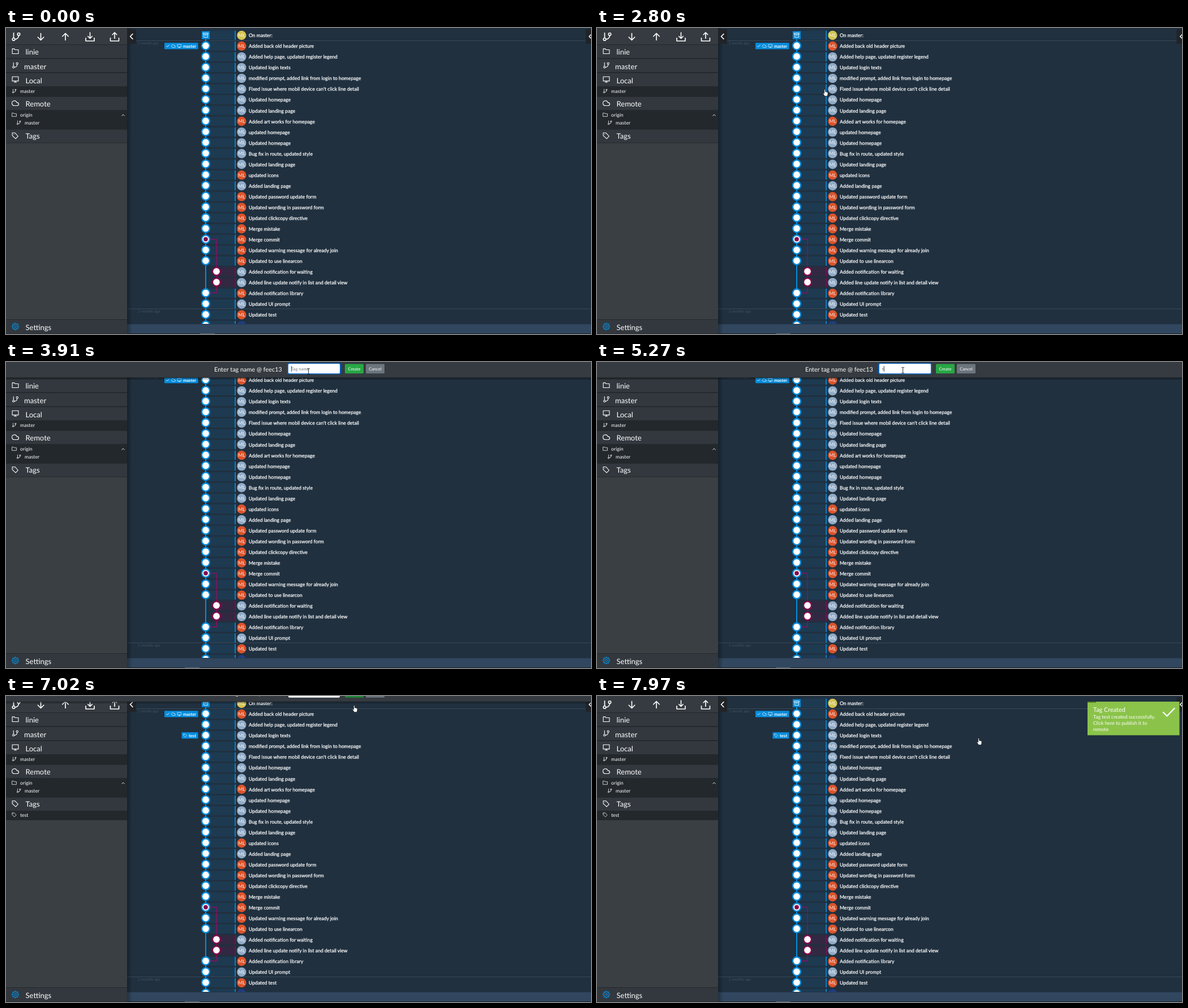
An HTML page for the animation above (8000 ms loop, 1034x542 px).

```html
<!DOCTYPE html>
<html lang="en">
<head>
<meta charset="utf-8">
<title>Commit graph: create a tag</title>
<style>
html, body { margin: 0; width: 100%; height: 100%; overflow: hidden; background: #20303f; }
svg { display: block; }
text {
  font-family: Lato, "Open Sans", sans-serif; fill: #fff; white-space: pre;
  text-rendering: geometricPrecision;
}
.ico { fill: none; stroke-linecap: round; stroke-linejoin: round; }

/* One shared 8 s clock; 1% is 80 ms */
.anim { animation: 8s linear infinite; }
.step { animation: 8s step-end infinite; }

#panel { animation-name: panel; }
@keyframes panel {
  0%, 35.25% { transform: translateY(-31px); animation-timing-function: ease; }
  37.75%, 86.94% { transform: none; animation-timing-function: ease; }
  89.44%, 100% { transform: translateY(-31px); }
}

#cursor { animation-name: move; }
@keyframes move {
  0%, 5.375% { transform: translate(609px, 426px); }
  6.125% { transform: translate(420px, 265px); }
  7%, 9.875% { transform: translate(249px, 117px); }
  11.25% { transform: translate(300px, 84px); }
  12.75% { transform: translate(440px, 30px); }
  13.75% { transform: translate(478px, 12px); }
  15.625%, 24.125% { transform: translate(380px, 71px); }
  26.375%, 28.625% { transform: translate(397px, 92px); }
  30.375%, 38.75% { transform: translate(399px, 108px); }
  44.25%, 44.875% { transform: translate(515px, 17px); }
  50.375%, 77.625% { transform: translate(537px, 9px); }
  82.375%, 94.75% { transform: translate(612px, 16px); }
  99.625%, 100% { transform: translate(671px, 74px); }
}
#arrow { animation-name: arrow; }
@keyframes arrow {
  0% { visibility: hidden; } 5.375% { visibility: visible; }
  11.5% { visibility: hidden; } 40% { visibility: visible; }
  44.875% { visibility: hidden; } 78.625% { visibility: visible; }
  80.375%, 100% { visibility: hidden; }
}
#hand { animation-name: hand; }
@keyframes hand {
  0% { visibility: hidden; } 11.5% { visibility: visible; }
  40% { visibility: hidden; } 80.375%, 100% { visibility: visible; }
}
#ibeam { animation-name: ibeam; }
@keyframes ibeam {
  0% { visibility: hidden; } 44.875% { visibility: visible; }
  78.625%, 100% { visibility: hidden; }
}

#hover3 { animation-name: hover3; }
@keyframes hover3 {
  0% { visibility: hidden; } 15.5% { visibility: visible; }
  24.125%, 100% { visibility: hidden; }
}
#hover5 { animation-name: hover5; }
@keyframes hover5 {
  0% { visibility: hidden; } 35.75% { visibility: visible; }
  39.5%, 100% { visibility: hidden; }
}
#thumb { animation-name: thumb; }
@keyframes thumb {
  0% { transform: none; } 17.5%, 100% { transform: translateX(-27px); }
}

#focus { animation-name: focus; }
@keyframes focus {
  0% { visibility: hidden; } 48% { visibility: visible; }
  84.75%, 100% { visibility: hidden; }
}
#hint { animation-name: hint; }
@keyframes hint {
  0% { visibility: visible; } 65.875%, 100% { visibility: hidden; }
}
#k0 { animation-name: k0; }
#k1 { animation-name: k1; }
#k2 { animation-name: k2; }
#k3 { animation-name: k3; }
@keyframes k0 { 0% { visibility: hidden; } 65.875%, 100% { visibility: visible; } }
@keyframes k1 { 0% { visibility: hidden; } 67.5%, 100% { visibility: visible; } }
@keyframes k2 { 0% { visibility: hidden; } 71.125%, 100% { visibility: visible; } }
@keyframes k3 { 0% { visibility: hidden; } 72.125%, 100% { visibility: visible; } }
#caret { animation-name: blink, caret; }
@keyframes blink {
  0% { visibility: hidden; } 48% { visibility: visible; }
  54.25% { visibility: hidden; } 60.5% { visibility: visible; }
  78.375% { visibility: hidden; } 84.625% { visibility: visible; }
  87%, 100% { visibility: hidden; }
}
@keyframes caret {
  0% { transform: none; } 65.875% { transform: translateX(2.9px); }
  67.5% { transform: translateX(6.9px); } 71.125% { transform: translateX(10.3px); }
  72.125%, 100% { transform: translateX(13.2px); }
}
#create { animation-name: create; }
@keyframes create {
  0% { fill: #28a745; } 80.375%, 100% { fill: #218838; }
}

.made { animation-name: made; }
@keyframes made {
  0% { visibility: hidden; } 87%, 100% { visibility: visible; }
}
#toast { animation-name: toast; }
@keyframes toast {
  0%, 90.5% { opacity: 0; } 93.5%, 100% { opacity: 1; }
}
#bar { animation-name: bar; }
@keyframes bar {
  0%, 93.5% { transform: scaleX(0); } 100% { transform: scaleX(.1); }
}
</style>
</head>
<body>
<script>
const BLUE = '#078ddd', PLUM = '#85094e', DARK = '#23282d';
const AVATAR = { Y: '#d3c452', O: '#dc532a', B: '#91abc6', N: '#1d3c80' };
const COMMITS = `Y On master:
O Added back old header picture
B Added help page, updated register legend
B Updated login texts
B modified prompt, added link from login to homepage
B Fixed issue where mobil device can't click line detail
B Updated homepage
B Updated landing page
O Added art works for homepage
B updated homepage
B Updated homepage
B Bug fix in route, updated style
B Updated landing page
O updated icons
B Added landing page
O Updated password update form
O Updated wording in password form
O Updated clickcopy directive
O Merge mistake
O Merge commit
O Updated warning message for already join
O Updated to use linearcon
B Added notification for waiting
B Added line update notify in list and detail view
O Added notification library
B Updated UI prompt
O Updated test
N `.split('\n');

// Outline icons on a 24 unit grid
const dot = (x, y, r) => `M${x - r} ${y}a${r} ${r} 0 1 0 ${2 * r} 0a${r} ${r} 0 1 0 ${-2 * r} 0`;
const teeth = [...Array(16)].map((_, i) => {
  const point = (r, a) => `${12 + r * Math.cos(a)} ${12 + r * Math.sin(a)}`;
  const a = i * Math.PI / 8, r = i % 2 ? 8 : 11;
  return point(r, a - .15) + 'L' + point(r, a + .15);
}).join('L');
const ICONS = {
  branch: 'M6 3v12M18 9a9 9 0 0 1-9 9' + dot(18, 6, 3) + dot(6, 18, 3),
  down: 'M12 4v16M5 13l7 7 7-7',
  up: 'M12 20V4M5 11l7-7 7 7',
  download: 'M2 15v7h20v-7M12 2v14M7 11l5 5 5-5',
  upload: 'M2 15v7h20v-7M12 16V2M7 7l5-5 5 5',
  folder: 'M2 4h7l2 3h11v13H2z',
  monitor: 'M2 3h20v14H2zM8 21h8M12 17v4',
  cloud: 'M18 10h-1.3A8 8 0 1 0 9 20h9a5 5 0 0 0 0-10z',
  tag: 'M21 13l-8 8L2 11V2h9zM7 7h.1',
  check: 'M20 6L9 17l-5-5',
  archive: 'M2 3h20v5H2zM4 8v13h16V8M9 12h6',
  gear: `M${teeth}z` + dot(12, 12, 3.5),
  left: 'M15 5l-7 7 7 7',
  collapse: 'M5 15l7-7 7 7'
};

const icon = (name, x, y, size, color = '#fff', weight = 2) =>
  `<path class="ico" d="${ICONS[name]}" stroke="${color}" stroke-width="${weight}"
    transform="translate(${x - size / 2} ${y - size / 2}) scale(${size / 24})"/>`;
const rect = (x, y, w, h, fill, extra = '') =>
  `<rect x="${x}" y="${y}" width="${w}" height="${h}" fill="${fill}" ${extra}/>`;
const text = (x, y, size, body, extra = '') =>
  `<text x="${x}" y="${y}" dy=".35em" font-size="${size}" ${extra}>${body}</text>`;
const rowY = i => 13 + 19.04 * i;
const nodeY = i => rowY(i) - .7;

function commit(line, i) {
  const y = rowY(i), cy = nodeY(i), top = y - 8.3, h = 16.3;
  const side = i === 22 || i === 23, x = side ? 372 : 353;
  const color = side ? PLUM : BLUE;
  const hover = i === 3 || i === 5
    ? rect(354, top, 51, h, '#15516f', `id="hover${i}" class="step"`) : '';
  const node = i
    ? `<circle cx="${x}" cy="${cy}" r="7" fill="#fff" stroke="${color}" stroke-width="2.3"/>`
    : rect(346, 5.7, 14, 14, BLUE) + icon('archive', 353, 12.7, 10);
  return rect(x, top, 405 - x, h, color, `opacity="${side ? .18 : .11}"`) + hover
    + rect(404.3, top, 1.7, h, color) + node
    + (i === 19 ? `<circle cx="353" cy="${cy}" r="3.9" fill="${PLUM}"/>` : '')
    + `<circle cx="416.4" cy="${y}" r="8.2" fill="${AVATAR[line[0]]}"/>`
    + text(416.4, y, 8.7, 'ML', 'text-anchor="middle" opacity=".85"')
    + text(429, y + .2, 8.65, line.slice(2), 'stroke="#fff" stroke-width=".25"');
}

function graph() {
  const a = nodeY(19), b = nodeY(24);
  const line = y => rect(214, y, 820, 1, '#394858');
  const age = (y, body) => text(233, y, 6.6, body, 'style="fill:#435261"');
  return line(22) + line(497) + age(26.5, '1 month ago') + age(502, '2 months ago')
    + rect(352, 18, 2, 508, BLUE)
    + `<path d="M353 ${a}H372V${b}H353" fill="none" stroke="${PLUM}" stroke-width="1.8"/>`
    + COMMITS.map(commit).join('')
    + rect(280, 26.2, 59.5, 11.3, BLUE, 'rx="1"') + icon('check', 286, 32, 7, '#fff', 3)
    + icon('cloud', 296, 32, 7.5) + icon('monitor', 306.5, 32, 7.5)
    + text(313, 32.2, 7.5, 'master', 'font-weight="700"')
    + `<g class="step made">${rect(310.5, 64.3, 29, 11.3, BLUE, 'rx="1"')}
      ${icon('tag', 316.5, 70.2, 7)}${text(323, 70.3, 7.6, 'test', 'font-weight="700"')}</g>`
    + rect(214, 524, 820, 18, '#31475f') + rect(214, 524, 820, 1, '#253749')
    + rect(0, 541, 1034, 1, '#171c22')
    + rect(343, 541, 26, 1, '#59636d', 'id="thumb" class="step"');
}

function sidebar() {
  const head = (y, h, name, color) => rect(0, y, 214, h, '#32383e')
    + rect(0, y, 214, 1, DARK) + rect(0, y + h - 1, 214, 1, '#262b2f')
    + icon(name, 16.5, y + h / 2 - .3, 13, color);
  const title = (x, y, label) => text(x, y + .8, 13.05, label);
  const item = (x, y, name, label) =>
    icon(name, x, y - .3, 9) + text(x + 10.4, y + .4, 8.7, label);
  return rect(0, 0, 214, 541, '#3a3f44') + rect(0, 0, 214, 29, '#353b40')
    + ['branch', 'down', 'up', 'download', 'upload']
      .map((name, i) => icon(name, 18 + 43.5 * i, 15.5, 18, '#fff', 2.2)).join('')
    + head(29, 25, 'folder') + title(34.5, 42, 'linie')
    + head(54, 25, 'branch') + title(32, 67.5, 'master')
    + head(79, 25, 'monitor') + title(34.5, 92.3, 'Local')
    + rect(0, 104, 214, 17, DARK) + item(14.7, 112, 'branch', 'master')
    + head(121, 25, 'cloud') + title(34.5, 134, 'Remote')
    + rect(0, 146, 214, 33, DARK) + item(14.7, 154, 'folder', 'origin')
    + icon('collapse', 207, 154.5, 8, '#fff', 2.6) + item(22.7, 168, 'branch', 'master')
    + head(179, 25, 'tag') + title(34.5, 191, 'Tags')
    + `<g class="step made">${rect(0, 204, 214, 16, DARK)}${item(14.5, 211, 'tag', 'test')}</g>`
    + head(516, 26, 'gear', BLUE) + title(34.5, 529.7, 'Settings')
    + rect(214, 2, 16, 26, '#202428', 'rx="2"') + icon('left', 222, 15, 15, '#fff', 2.6)
    + rect(1024.5, 2, 14, 26, '#202428', 'rx="2"') + icon('left', 1033, 15, 14, '#fff', 2.6);
}

const panel = () => `<g id="panel" class="anim">
  ${rect(0, 28, 1034, 3, '#000', 'opacity=".25"')}${rect(0, -6, 1034, 34, '#353b40')}
  ${rect(0, 27, 1034, 1, '#22272b')}
  ${text(368, 12.7, 10.88, 'Enter tag name @ feec13')}
  ${rect(497, 1.8, 95, 20, '#0a63c4', 'rx="3" id="focus" class="step"')}
  ${rect(499, 3.3, 91, 17, '#fff', 'rx="1.8"')}
  ${text(504, 12, 7.6, 'Tag name', 'id="hint" class="step" style="fill:#7b848c"')}
  ${text(504, 12, 7.6, [...'test'].map((c, i) =>
    `<tspan id="k${i}" class="step">${c}</tspan>`).join(''), 'style="fill:#495057"')}
  ${rect(504, 7, .8, 10, '#222', 'id="caret" class="step"')}
  ${rect(599, 3.5, 33, 16.8, '#28a745', 'rx="1.6" id="create" class="step"')}
  ${text(615.5, 12, 7.6, 'Create', 'text-anchor="middle"')}
  ${rect(636, 3.5, 33, 16.8, '#6c757d', 'rx="1.6"')}
  ${text(652.5, 12, 7.6, 'Cancel', 'text-anchor="middle"')}</g>`;

const toast = () => `<g id="toast" class="anim">
  ${rect(867, 10, 162.5, 59.5, '#8bc34a')}
  ${rect(867, 10, 162.5, 1.6, '#000', 'id="bar" class="anim" opacity=".4" style="transform-origin:867px 0"')}
  ${text(877, 23.8, 10.88, 'Tag Created')}
  ${['Tag test created successfully.', 'Click here to publish it to', 'remote']
    .map((s, i) => text(877, 37.3 + 10.8 * i, 8.7, s)).join('')}
  <path class="ico" d="M1001 29l6.5 6.5L1020.5 22" stroke="#fff" stroke-width="2.4"/></g>`;

const cursor = () => `<g id="cursor" class="anim">
  <path id="arrow" class="step" d="M.5 .5v12l2.8-2.6 1.9 4.3 1.9-.9-1.9-4.1h3.8z"
    fill="#fff" stroke="#111" stroke-width=".7"/>
  <path id="hand" class="step" d="M2.6 1.2q1-1 1.9 0V5q1-.6 1.6.3 1-.5 1.5.4 1.1-.3 1.4.7V9.5L7.9 12.7H3.7L.6 8.3q-.2-1.3 1-1.1l1 1z"
    fill="#fff" stroke="#111" stroke-width=".7"/>
  <path id="ibeam" class="step" d="M1.5 .5h1.5l.7.6.7-.6h1.5M3.7 1v9M1.5 10.5h1.5l.7-.6.7.6h1.5"
    fill="none" stroke="#111" stroke-width=".9"/></g>`;

document.body.innerHTML = `<svg width="1034" height="542" viewBox="0 0 1034 542">
  <defs><linearGradient id="edge"><stop stop-color="#000" stop-opacity=".3"/>
  <stop offset="1" stop-opacity="0"/></linearGradient></defs>
  ${rect(0, 0, 1034, 542, '#20303f')}${graph()}${rect(214, 0, 9, 541, 'url(#edge)')}
  ${sidebar()}${panel()}${toast()}${cursor()}</svg>`;
</script>
</body>
</html>
```
